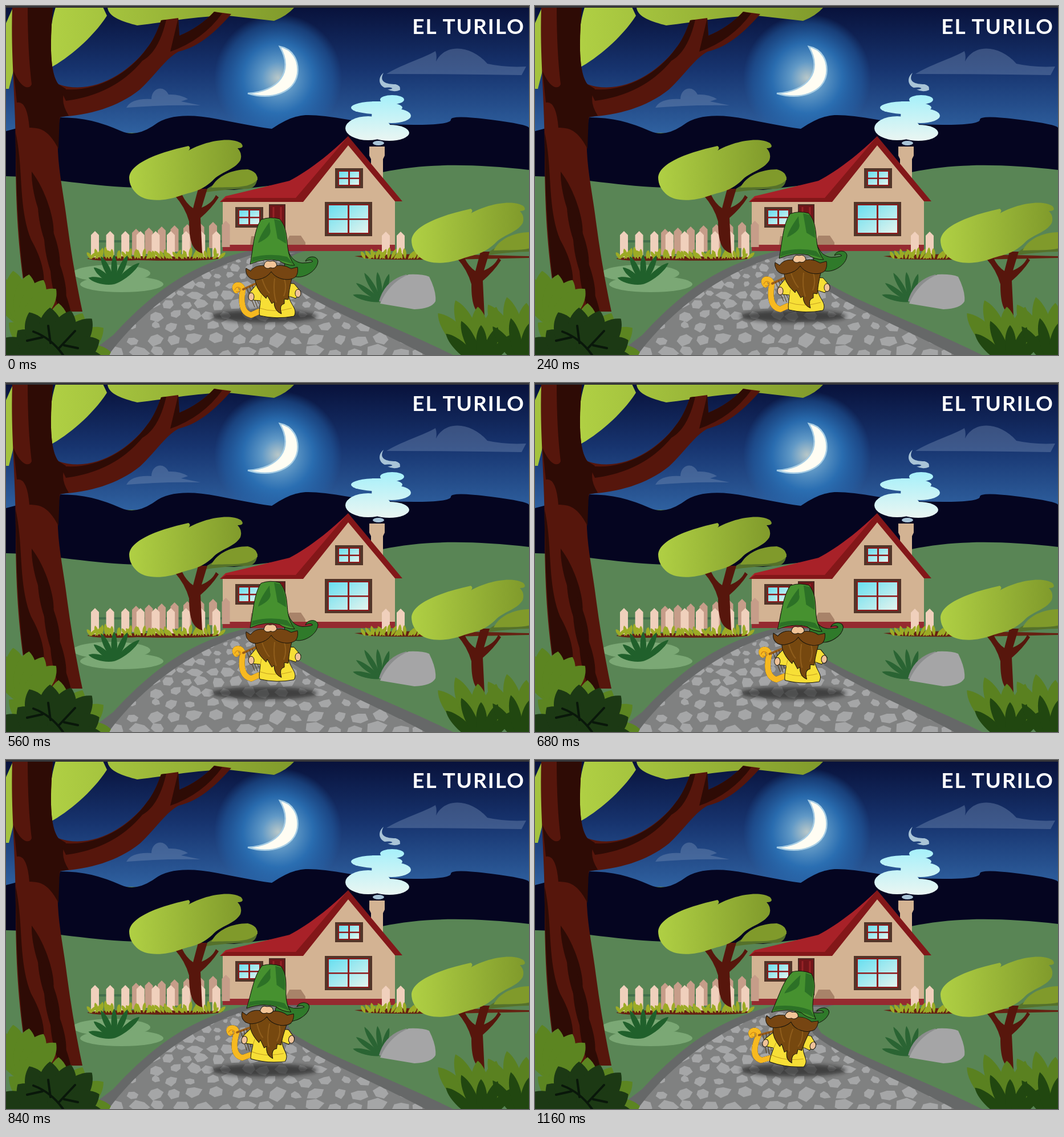
Animation, 917 px wide and 611 px high, one loop 1200 ms. Source, as an HTML page:

```html
<!DOCTYPE html>
<html lang="es">
<head>
<meta charset="utf-8">
<style>
html, body { margin: 0; width: 100%; height: 100%; overflow: hidden; background: #598555; }
svg { display: block; width: 100%; height: 100%; }
</style>
</head>
<body>
<svg viewBox="0 0 917 611">
<defs>
  <linearGradient id="sky" x2="0" y2="1"><stop stop-color="#08113a"/><stop offset=".5" stop-color="#17346f"/><stop offset="1" stop-color="#2f61a0"/></linearGradient>
  <radialGradient id="glow"><stop stop-color="#b9c8c9"/><stop offset=".25" stop-color="#6199c6"/><stop offset=".55" stop-color="#2b72b6" stop-opacity=".9"/><stop offset=".85" stop-color="#2465ab" stop-opacity=".45"/><stop offset="1" stop-color="#2465ab" stop-opacity="0"/></radialGradient>
  <linearGradient id="leaf"><stop stop-color="#b0d044"/><stop offset="1" stop-color="#809a2b"/></linearGradient>
  <linearGradient id="glass" x2="1" y2="1"><stop stop-color="#68dff0"/><stop offset="1" stop-color="#e4f4ee"/></linearGradient>
  <linearGradient id="smoke" gradientUnits="userSpaceOnUse" x1="0" y1="155" x2="0" y2="238"><stop stop-color="#a5f0fa"/><stop offset="1" stop-color="#ecf6f2"/></linearGradient>
  <filter id="soft" x="-20%" y="-50%" width="140%" height="200%"><feGaussianBlur stdDeviation="3"/></filter>
  <path id="road" d="M444 432H508C472 441 471 463 493 484C550 527 650 565 735 611H180C230 543 318 466 444 432Z"/>
  <clipPath id="inRoad"><use href="#road"/></clipPath>
  <g id="tree">
    <path fill="#55712b" d="M343 327Q380 296 441 299Q440 318 425 320Q390 320 343 327Z"/>
    <path fill="#57160c" d="M344 433C328 428 321 415 321 377Q314 352 296 332L309 331Q316 346 328 354L337 320H353L343 353Q362 345 368 331L373 335Q360 355 341 371Z"/>
    <path fill="#809a2b" d="M360 318C370 298 395 286 424 286Q441 290 441 304C425 321 395 316 360 318Z"/>
    <path fill="url(#leaf)" d="M216 300C218 274 270 256 320 245Q325 248 320 253C344 239 390 227 412 240Q420 249 406 249Q415 258 411 270C400 288 376 290 362 306C340 326 325 325 306 332C276 343 246 342 232 331Q216 318 216 300Z"/>
  </g>
</defs>

<rect width="917" height="222" fill="url(#sky)"/>
<circle cx="477" cy="126" r="112" fill="url(#glow)"/>
<path fill="#fffdf3" stroke="#a7cde4" stroke-width="2.5" d="M480 71C503 75 514 96 511 119C506 151 466 166 424 153C477 150 506 115 480 71Z"/>
<g fill="#7d94b8" fill-opacity=".38">
  <path d="M667 119C690 104 735 90 753 79Q756 87 754 97C770 65 815 68 844 101Q875 108 912 106L904 121Q785 119 667 119Z"/>
  <path d="M211 178Q220 161 255 163C255 144 276 137 285 155Q305 154 319 163L307 167L341 174Q270 173 211 178Z"/>
</g>
<path fill="#050520" d="M0 219L92 195Q125 195 150 201T202 219T262 207T371 198T466 215Q500 192 525 191T600 199T715 208T780 199T850 199T917 214V330H0Z"/>
<path fill="#598555" d="M0 298C82 300 146 317 240 318L400 322L660 291C736 275 818 276 917 287V611H0Z"/>
<g fill="#7ba875"><ellipse cx="185" cy="468" rx="68" ry="15"/><ellipse cx="203" cy="487" rx="73" ry="14"/></g>

<path fill="#666868" d="M425 429H525C490 436 487 456 502 478C560 517 670 555 784 611H142L188 576C250 508 320 452 425 429Z"/>
<use href="#road" fill="#808181"/>
<g id="stones" fill="#a5a6a7" clip-path="url(#inRoad)"/></g>
<ellipse cx="453" cy="543" rx="93" ry="11" fill="#191919" opacity=".6" filter="url(#soft)"/>

<g fill="#d3b393"><path d="M637 246H664V262L661 268V305H640V268L637 262Z"/><path d="M390 341H510L600 238L682 338V429H380V341Z"/></g>
<path fill="#a82128" d="M600 228C567 260 530 289 497 306L435 321L385 333L375 343H510L600 243Z"/>
<path fill="#831719" d="M375 343L386 336H508L594 235L600 228L695 342H682L600 244L521 343Z"/>
<path fill="#952a30" d="M380 418H682V429H380Z"/>
<path fill="#a88369" d="M497 402H517L525 414V418H489ZM430 403H458V418H428Z"/>
<path fill="#711519" stroke="#4b2822" stroke-width="2" d="M462 348H489V411H462Z"/>
<path stroke="#972226" stroke-width="3" d="M469 352V408M482 352V408"/>
<g id="windows"></g>

<g fill="url(#smoke)">
  <ellipse cx="677" cy="164" rx="21" ry="8"/><ellipse cx="650" cy="178" rx="45" ry="11"/><ellipse cx="676" cy="192" rx="34" ry="13"/>
  <ellipse cx="635" cy="214" rx="40" ry="21"/><ellipse cx="672" cy="222" rx="35" ry="14"/><path d="M642 167H682V202H641Z"/>
</g>
<g fill="#a9c4d7"><path d="M662 117C653 133 667 137 683 137Q692 139 691 147Q680 152 669 146C685 145 675 141 664 143C653 138 652 125 662 117Z"/><ellipse cx="653" cy="240" rx="10" ry="4"/></g>

<g id="fence"></g>
<path fill="#662112" d="M142 442Q180 435 380 440Q374 448 230 445Q155 448 142 442ZM611 438Q680 431 917 438V441Q720 446 640 443Z"/>
<g id="grass"></g>
<use href="#tree"/>
<g id="plants"></g>
<path fill="#8c8e8e" d="M654 517Q664 480 702 470L720 500L668 521Z"/>
<path fill="#a5a5a6" d="M656 521Q672 484 706 470Q730 469 742 474Q755 500 753 517Q746 530 716 531Z"/>
<use href="#tree" x="495" y="110"/>

<path fill="url(#leaf)" d="M87 2C75 40 77 75 78 108C108 92 151 57 177 17L170 2ZM178 2C179 20 207 28 230 34C270 30 335 17 390 17L470 26Q493 17 506 2Z"/>
<path fill="#a5c33f" d="M0 30L12 3L14 110L5 145H0Z"/>
<path fill="#56160c" d="M11 2H82C78 55 75 115 92 137C150 157 213 119 247 74Q261 57 272 25L302 21L304 52Q340 37 365 10L395 14C373 39 342 71 302 80C278 94 263 120 235 146C195 178 145 191 95 194C83 254 99 312 107 378Q118 461 134 535H39C22 442 17 356 17 260C17 160 8 90 11 2Z"/>
<g id="bark" fill="#2e0b05">
  <path d="M38 2H82C78 55 75 115 92 137L105 145Q93 165 110 192L94 195L92 250C72 211 54 214 41 213Q37 165 19 169L13 113C26 145 41 147 45 137Q38 80 38 2ZM17 222C31 285 21 352 44 409Q70 455 66 491L48 535H39Q17 400 17 222Z"/>
  <path d="M95 145C153 153 213 122 247 74Q261 57 272 25L281 24Q268 80 239 96Q190 155 105 166ZM302 21L304 52Q340 37 365 10L379 13Q345 60 288 80Z"/>
</g>
<g id="bushes"></g>
<path fill="none" stroke="#09170a" stroke-width="4" stroke-linecap="round" d="M100 611Q80 582 48 570M78 590L74 560M92 600L121 569M102 594L126 599M64 580L37 586"/>

<g id="gnome" stroke="#15130c" stroke-linejoin="round">
  <path id="tail" fill="#2f7a2a" d="M493 422C497 440 507 449 520 450Q541 449 537 446Q532 443 525 447C528 437 546 436 547 447C546 463 524 477 508 474L488 456Z"/>
  <g fill="none" stroke-linecap="round">
    <path id="lyre" stroke-width="10" d="M404 498C395 487 415 484 415 498C412 516 412 537 430 541L443 535"/>
    <use href="#lyre" style="stroke:#f7b920"/>
    <path stroke="#f7b920" stroke-width="8" d="M404 498C395 487 415 484 415 498C412 516 412 537 430 541L443 535"/>
    <path stroke="#c77a15" d="M404 500Q414 502 411 494Q404 489 401 497"/>
    <path stroke="#9a5d18" stroke-width="4" d="M416 496L438 486"/>
    <path stroke="#473315" d="M422 494L436 527M427 491L441 528M432 489L443 521"/>
  </g>
  <path fill="#f7df36" d="M443 483L427 502L434 515L446 516C445 529 443 536 445 542Q475 549 505 543C512 530 498 523 496 508L508 512L517 500L505 486Z"/>
  <path fill="none" stroke="#c49e20" d="M445 529Q470 538 501 529M448 506L446 517M493 495L498 510"/>
  <g fill="#f0c39a"><ellipse cx="430" cy="509" rx="5" ry="7"/><ellipse cx="512" cy="503" rx="5" ry="7"/></g>
  <path fill="#76480f" d="M437 472Q434 492 456 512L458 507L466 521L470 518Q470 534 483 539Q478 523 488 521L488 513L495 514Q495 502 503 468L462 459Z"/>
  <path fill="none" stroke="#8f5d1c" stroke-width="2" d="M449 478Q455 496 462 503M471 477Q468 502 474 519M486 473Q494 491 487 508"/>
  <path fill="#764512" d="M463 458C448 451 435 455 429 464L421 459C419 470 427 481 441 479Q458 476 465 465C474 479 497 483 508 474Q513 467 511 457L500 460Q483 449 463 458Z"/>
  <path fill="#46912f" d="M447 374Q463 368 480 373C493 389 492 406 494 423Q496 441 506 454Q490 454 479 446Q455 440 428 452C433 429 434 393 447 374Z"/>
  <path fill="#2c7126" stroke="none" d="M470 373L482 376Q492 395 491 416L476 407ZM462 378Q444 403 442 415Q468 403 463 390ZM432 440Q463 432 493 439L504 452Q460 436 430 449Z"/>
  <path fill="#f2c497" d="M452 455Q454 444 463 447Q473 444 475 454Q471 461 464 458Q456 462 452 455Z"/>
</g>

<text x="910" y="49" text-anchor="end" fill="#fff" font-family="Lato, sans-serif" font-weight="700" font-size="37" letter-spacing="2">EL TURILO</text>
<path fill="#343438" d="M0 0H917V3H0Z"/>
</svg>
<script>
const el = id => document.getElementById(id);
const add = (id, markup) => el(id).insertAdjacentHTML('beforeend', markup);
const rect = (x, y, w, h, fill) => `<rect x="${x}" y="${y}" width="${w}" height="${h}" fill="${fill}"/>`;
const noise = n => { const v = Math.sin(n * 91.7) * 4371; return v - Math.floor(v); };

function pane(x, y, w, h) {
  const red = '#8f1a1c';
  add('windows', rect(x, y, w, h, '#523529') + rect(x + 5, y + 4, w - 10, h - 8, red)
    + rect(x + 7, y + 6, w - 14, h - 12, 'url(#glass)')
    + rect(x + w / 2 - 1.5, y + 4, 3, h - 8, red) + rect(x + 5, y + h / 2 - 1, w - 10, 2.5, red));
}
pane(402, 352, 49, 36);
pane(577, 284, 49, 35);
pane(559, 343, 83, 60);

function posts(n, x, step, y, rise, fill) {
  for (let i = 0; i < n; i++) add('fence', `<path fill="${fill}" d="M${x + i * step} ${y + 7 - i * rise}l7 -7l7 7v39h-14Z"/>`);
}
add('fence', rect(149, 410, 230, 4, '#426f4b'));
posts(8, 221, 22.5, 390, 2, '#c69d89');
posts(9, 149, 26.6, 394, 0, '#f0d0bc');
posts(2, 659, 26, 395, 0, '#f0d0bc');

// Pointed leaf from its foot to its tip.
function leaf(id, x, y, angle, len, w, fill) {
  const turn = angle * 180 / Math.PI;
  add(id, `<path fill="${fill}" transform="translate(${x} ${y}) rotate(${turn})" d="M0 0C${len * .3} ${-w} ${len * .8} ${-w} ${len} 0C${len * .8} ${w} ${len * .3} ${w} 0 0Z"/>`);
}
function fan(id, x, y, n, from, to, len, w, fill) {
  for (let i = 0; i < n; i++) leaf(id, x, y, from + (to - from) * i / (n - 1), len * (.88 + .24 * noise(i + x)), w, fill);
}
function tuft(from, to) {
  for (let x = from; x < to; x += 5) leaf('grass', x, 443, -2.4 + noise(x) * 1.7, 14 + noise(x + 3) * 8, 4, '#9cab25');
}
tuft(146, 262);
tuft(272, 376);
tuft(630, 722);
fan('plants', 190, 487, 6, -2.9, -.7, 52, 7, '#20602b');
fan('plants', 658, 518, 6, -2.9, -.9, 56, 6, '#2a6433');
for (let y = 290; y < 480; y += 55) leaf('bark', 45 + (y - 290) * .2, y, 1.25, 120, 13, '#2e0b05');

fan('bushes', 25, 560, 5, -2, -.8, 88, 26, '#5c8521');
fan('bushes', 90, 625, 7, -2.9, -.2, 102, 28, '#5c8521');
fan('bushes', 80, 628, 9, -3.1, -.1, 96, 30, '#1c3914');
fan('bushes', 835, 625, 5, -2.3, -1, 108, 21, '#5a8120');
fan('bushes', 905, 625, 4, -2.1, -1.2, 108, 21, '#5a8120');
fan('bushes', 835, 632, 5, -2.4, -.8, 80, 13, '#214710');
fan('bushes', 905, 632, 4, -2.2, -1, 80, 13, '#214710');

// Paving grows towards the viewer.
function stone(x, y, r, seed) {
  const pts = Array.from({ length: 6 }, (_, k) => {
    const a = k * Math.PI / 3 + seed, d = r * (.65 + noise(seed * 7 + k) * .5);
    return `${x + 1.4 * d * Math.cos(a)},${y + d * Math.sin(a)}`;
  });
  add('stones', `<polygon points="${pts.join(' ')}"/>`);
}
for (let y = 445, r = 6, seed = 1; y < 620; y += r * 2, r += .7) {
  for (let x = 175 + noise(seed) * 20; x < 740; x += r * 3.1, seed++) {
    stone(x + noise(seed) * r, y + noise(seed + 5) * r * .6, r * (.6 + noise(seed + 9) * .55), seed);
  }
}

// Rise straight up, then sink while leaning to the left.
function draw() {
  const t = Math.floor(performance.now() % 1200 / 40) * 40;
  const q = Math.max(0, (t - 560) / 600);
  const lift = -23.5 * (t < 560 ? t / 560 : 1 - q);
  el('gnome').setAttribute('transform', `matrix(1 ${.125 * q} ${-.225 * q} ${1 - .06 * q} ${88.5 * q} ${lift - 36.6 * q})`);
  el('tail').setAttribute('transform', `translate(${-21 * q} ${-7 * q})`);
  requestAnimationFrame(draw);
}
draw();
</script>
</body>
</html>
```
